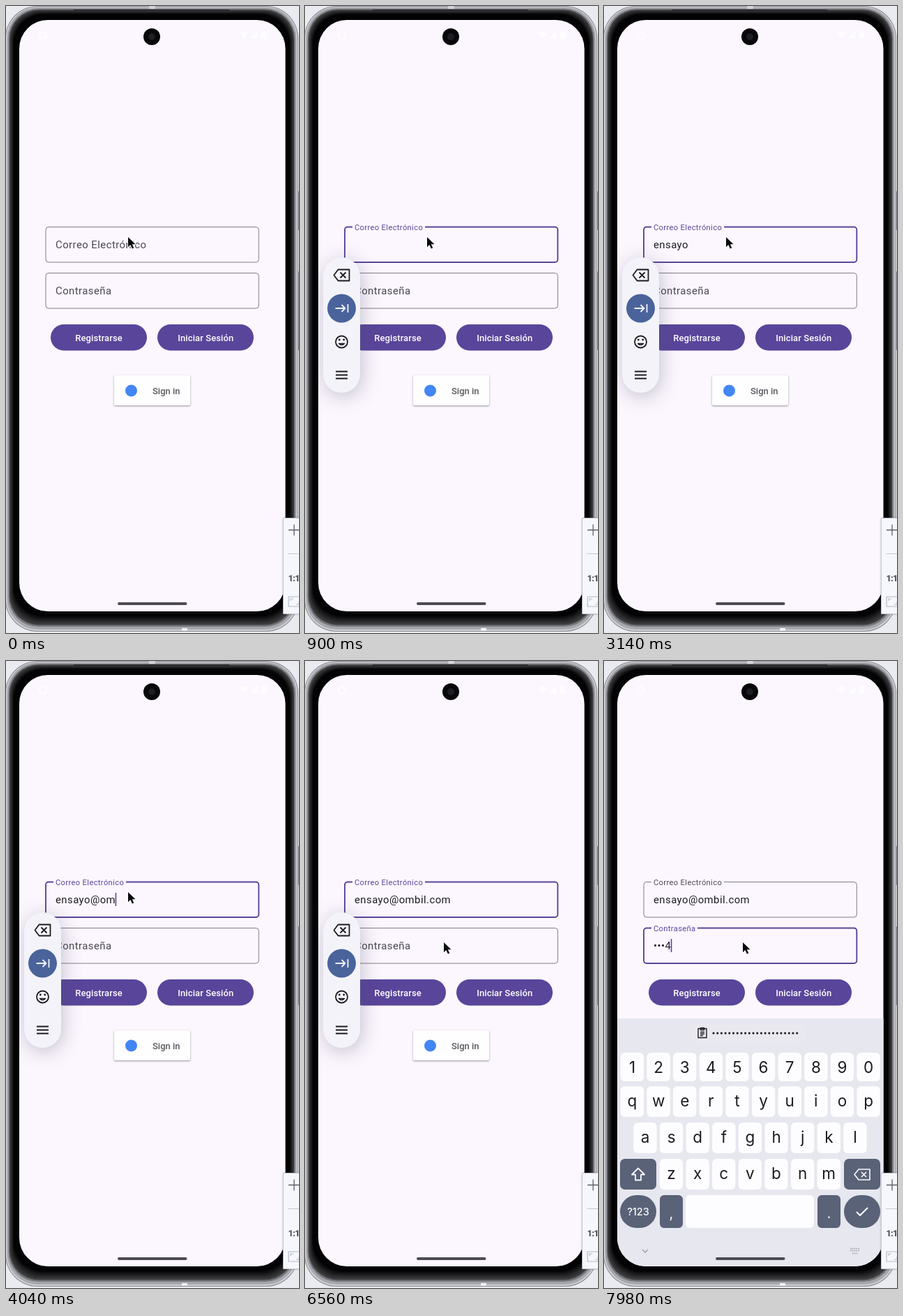
An HTML page with a canvas for the animation above (8 s loop, 420 by 898 pixels).

```html
<!DOCTYPE html>
<html lang="es">
<head>
<meta charset="utf-8">
<style>
html, body { margin: 0; width: 100%; height: 100%; overflow: hidden; background: #e9ebf1; }
canvas { display: block; width: 420px; height: 898px; }
</style>
</head>
<body>
<canvas id="stage"></canvas>
<script>
const LOOP = 8000;
const canvas = document.getElementById('stage');
const dpr = window.devicePixelRatio || 1;
canvas.width = 420 * dpr;
canvas.height = 898 * dpr;
const c = canvas.getContext('2d');

const SCREEN = '#fcf7fe', PURPLE = '#59459a', INK = '#1d1b20', SLATE = '#5a6278', KEY = '#fdfdff';
const EMAIL = 'ensayo@ombil.com';
const EMAIL_KEYS = [1400, 1580, 1760, 1940, 2120, 2400, 3200, 3600, 3860, 4240, 4440, 4660, 4900, 5120, 5340, 5570];
const PASS = '1234';
const PASS_KEYS = [7300, 7500, 7700, 7900];
const FOCUS_EMAIL = 280, FOCUS_PASS = 6680;

const clamp = v => Math.max(0, Math.min(1, v));
const ease = v => 1 - (1 - clamp(v)) ** 3;
const smooth = v => { v = clamp(v); return v * v * (3 - 2 * v); };
const mix = (a, b, k) => a + (b - a) * k;

function box(x, y, w, h, r, fill) {
  c.beginPath();
  c.roundRect(x, y, w, h, r);
  c.fillStyle = fill;
  c.fill();
}

function disc(x, y, r, fill) {
  c.beginPath();
  c.arc(x, y, r, 0, 7);
  c.fillStyle = fill;
  c.fill();
}

function text(str, x, y, size, color, { weight = 400, align = 'left', gap = 0, font = 'Roboto' } = {}) {
  c.font = `${weight} ${size}px ${font}, sans-serif`;
  c.letterSpacing = gap + 'px';
  c.textAlign = align;
  c.fillStyle = color;
  c.fillText(str, x, y);
  return c.measureText(str).width;
}

function icon(d, x, y, color, width = 1.8, dash = []) {
  c.save();
  c.translate(x, y);
  c.strokeStyle = color;
  c.lineWidth = width;
  c.setLineDash(dash);
  c.stroke(new Path2D(d));
  c.restore();
}

function shadow(color, blur, dx = 0, dy = 0) {
  c.shadowColor = color;
  c.shadowBlur = blur * dpr;
  c.shadowOffsetX = dx * dpr;
  c.shadowOffsetY = dy * dpr;
}

function drawPhone() {
  c.fillStyle = '#e9ebf1';
  c.fillRect(0, 0, 420, 898);
  box(417, 265, 3, 56, 1, '#8d8e97');
  box(417, 380, 3, 113, 1, '#8d8e97');
  box(-1, 0, 420, 896, 46, '#85868c');
  box(0, 1, 418, 894, 45, '#cfd0d6');
  box(1.5, 2, 415, 891, 44, '#a6a7ad');
  box(3.5, 4, 411, 885, 43, '#74757a');
  for (let i = 0; i < 7; i++) {
    const v = 63 - i * 10;
    box(5 + i, 5.5 + i, 408 - 2 * i, 881 - 3 * i, 42, `rgb(${v},${v},${v + 2})`);
  }
  box(97, 5, 223, 1.5, 0, '#25252b');
  box(205, 0, 9, 4, 1, '#d3d4da');
  box(252, 891, 8, 4, 1, '#f0f0f4');
  box(19, 20, 381.5, 847, 41, SCREEN);
}

function drawStatus() {
  c.globalAlpha = 0.8;
  c.strokeStyle = '#fff';
  c.lineWidth = 2;
  c.beginPath();
  c.arc(53, 42, 5, 0, 7);
  c.stroke();
  c.fillStyle = '#fff';
  c.fill(new Path2D('M335 39Q341 34 347 39L341 46ZM350 46L360 46L360 36Z'));
  box(366, 36, 7, 11, 1, '#fff');
  c.globalAlpha = 1;
}

function drawField(y, label, labelWidth, value, focused, lift, caret) {
  c.strokeStyle = focused ? PURPLE : '#807b88';
  c.lineWidth = focused ? 1.9 : 1;
  c.beginPath();
  c.roundRect(57, y + 0.5, 305.3, 50.5, 4);
  c.stroke();
  if (lift > 0) {
    const w = labelWidth * lift;
    c.fillStyle = SCREEN;
    c.fillRect(68 + (labelWidth - w) / 2, y - 2, w, 5);
  }
  text(label, 71, mix(y + 30.5, y + 4.5, lift), mix(14.86, 11.14, lift),
    focused ? PURPLE : '#4b4752', { gap: mix(0.46, 0.37, lift) });
  const w = value ? text(value, 71, y + 31, 14.86, INK, { gap: 0.46 }) : 0;
  if (caret) {
    c.fillStyle = PURPLE;
    c.fillRect(70.5 + w, y + 16, 1.6, 19);
  }
}

function drawButtons() {
  const style = { weight: 500, align: 'center', gap: 0.1 };
  box(64, 456, 138, 37.5, 19, PURPLE);
  text('Registrarse', 133, 480, 13, '#fff', style);
  box(217, 456, 138, 37.5, 19, PURPLE);
  text('Iniciar Sesión', 286.3, 480, 13, '#fff', style);
  c.save();
  shadow('rgba(40,40,50,.5)', 2.5, 0, 1);
  box(155, 529, 109, 43, 2, '#fefeff');
  c.restore();
  disc(179.5, 551, 8.5, '#4285f4');
  text('Sign in', 210, 556, 13, '#58585e', { weight: 500 });
}

function drawToolbar(show) {
  if (show <= 0) return;
  c.save();
  c.globalAlpha = show;
  c.translate((show - 1) * 30, 0);
  c.save();
  shadow('rgba(75,75,105,.32)', 28, 2, 5);
  box(26, 360, 53, 194, 26.5, '#f3f3f9');
  c.restore();
  disc(52.5, 433, 20.5, '#4a639b');
  icon('M-11 0L-5 -8H11V8H-5ZM-2 -4L6 4M6 -4L-2 4', 52.5, 385.5, INK);
  icon('M-9 0H5M0 -5L5 0L0 5M9 -6V6', 52.5, 433, '#f1f4fc');
  icon('M8.5 0A8.5 8.5 0 1 1 -8.5 0A8.5 8.5 0 1 1 8.5 0', 52.5, 481, INK);
  icon('M-4 2.5Q0 6.5 4 2.5Z', 52.5, 481, INK, 1.4);
  disc(49.3, 478, 1.4, INK);
  disc(55.7, 478, 1.4, INK);
  icon('M-8.5 -5H8.5M-8.5 0H8.5M-8.5 5H8.5', 52.5, 528.5, INK);
  c.restore();
}

function keyRow(chars, x, y, h) {
  [...chars].forEach((ch, i) => {
    const cx = x + i * 37.62;
    box(cx - 16.7, y, 33.4, h, 6, KEY);
    text(ch, cx, y + 29, 22.5, INK, { align: 'center', font: 'Inter' });
  });
}

function drawKeyboard(show) {
  if (show <= 0) return;
  c.save();
  c.translate(0, (1 - show) * 355);
  c.fillStyle = '#e6e7ef';
  c.fillRect(19, 512, 382, 356);
  box(126, 520, 163, 27, 8, '#e9e9ef');
  icon('M-6 -6H6V7H-6ZM-2.5 -7H2.5V-4H-2.5ZM-3 -1H3M-3 1.5H3M-3 4H1', 141, 532.5, INK, 1.4);
  for (let i = 0; i < 22; i++) disc(157 + i * 5.7, 533, 1.6, INK);

  keyRow('1234567890', 40.5, 561, 41);
  keyRow('qwertyuiop', 40.5, 609, 44);
  keyRow('asdfghjkl', 59, 661, 44);
  keyRow('zxcvbnm', 96.5, 713, 44);

  box(23, 713, 52, 44, 7, SLATE);
  icon('M0 -9L9 0H4V8H-4V0H-9Z', 49, 735.5, '#fafaff');
  box(344, 713, 52, 44, 7, SLATE);
  icon('M-11 0L-5 -7.5H11V7.5H-5ZM-1 -3.5L6 3.5M6 -3.5L-1 3.5', 370, 735.5, '#fafaff', 1.6);

  const label = { align: 'center', font: 'Inter' };
  box(23, 765, 52, 47, 23.5, SLATE);
  text('?123', 49, 794, 14.5, '#fbfbff', { ...label, weight: 500 });
  box(80, 765, 33, 47, 6, SLATE);
  text(',', 96.5, 798, 20, '#fbfbff', label);
  box(117, 765, 184, 47, 6, KEY);
  box(306, 765, 33, 47, 6, SLATE);
  text('.', 322.5, 798, 20, '#fbfbff', label);
  box(344, 765, 52, 47, 23.5, SLATE);
  icon('M-8 0L-3 5L8 -6', 370, 789, '#fbfbff', 2);

  icon('M-4 -2L0 2L4 -2', 59, 845, '#9a9ca8', 1.4);
  icon('M-7 -3H7M-7 0H7M-4 4H4', 360, 844.5, '#a2a4b0', 1.6, [1.8, 1]);
  c.restore();
}

function drawPanel() {
  c.save();
  shadow('rgba(50,50,65,.35)', 3);
  box(397, 733, 40, 138, 4, '#f5f7fc');
  c.restore();
  c.strokeStyle = '#c8cad3';
  c.lineWidth = 1;
  c.strokeRect(397.5, 733.5, 40, 137);
  icon('M-8 0H8M0 -8V8', 413, 750.5, '#5c5f68', 1.3);
  icon('M0 0H20', 404, 784.5, '#c6c9d2', 1);
  text('1:1', 404.5, 823.5, 12.5, '#55585f', { weight: 800, gap: -0.8 });
  icon('M1 0H20V14H1ZM4 6V3H8M12 11H16V7', 404, 846, '#b5b9c4', 1.2);
}

function drawPointer(x, y) {
  const arrow = new Path2D('M0 0V14.2L3.3 11.1L5.9 16.6L8.3 15.5L5.8 10.2H10.5Z');
  c.save();
  c.translate(x, y);
  c.strokeStyle = '#fdfdff';
  c.lineWidth = 2;
  c.stroke(arrow);
  c.fillStyle = '#0a0a0c';
  c.fill(arrow);
  c.restore();
}

const typed = (keys, t) => keys.filter(k => k <= t).length;

function caretOn(t, start, keys, n) {
  const since = n ? keys[n - 1] : start;
  return t >= start && (t - since) % 1000 < 500;
}

function draw(t) {
  c.setTransform(dpr, 0, 0, dpr, 0, 0);
  c.lineJoin = 'round';
  const n = typed(EMAIL_KEYS, t), m = typed(PASS_KEYS, t);
  const onPass = t >= FOCUS_PASS, onEmail = t >= FOCUS_EMAIL && !onPass;

  drawPhone();
  c.save();
  c.beginPath();
  c.roundRect(19, 20, 381.5, 847, 41);
  c.clip();
  drawStatus();
  drawField(316, 'Correo Electrónico', 104, EMAIL.slice(0, n), onEmail,
    smooth((t - FOCUS_EMAIL) / 150), onEmail && caretOn(t, FOCUS_EMAIL, EMAIL_KEYS, n));
  const secret = m ? '•'.repeat(m - 1) + PASS[m - 1] : '';
  drawField(382, 'Contraseña', 66, secret, onPass,
    smooth((t - FOCUS_PASS) / 150), onPass && caretOn(t, FOCUS_PASS, PASS_KEYS, m));
  drawButtons();
  drawToolbar(ease((t - 440) / 200) * (1 - clamp((t - 6800) / 120)));
  drawKeyboard(ease((t - 6840) / 285));
  c.restore();

  disc(209, 44, 12, '#08080a');
  disc(209, 44, 5, '#1d1d22');
  box(160, 854, 99.5, 4, 2, '#4f4b55');
  drawPanel();
  const k = smooth((t - 5900) / 450);
  drawPointer(mix(175, 199, k), mix(331, 403, k));
}

const start = performance.now();
function tick() {
  draw((performance.now() - start) % LOOP);
  requestAnimationFrame(tick);
}
tick();
</script>
</body>
</html>
```
